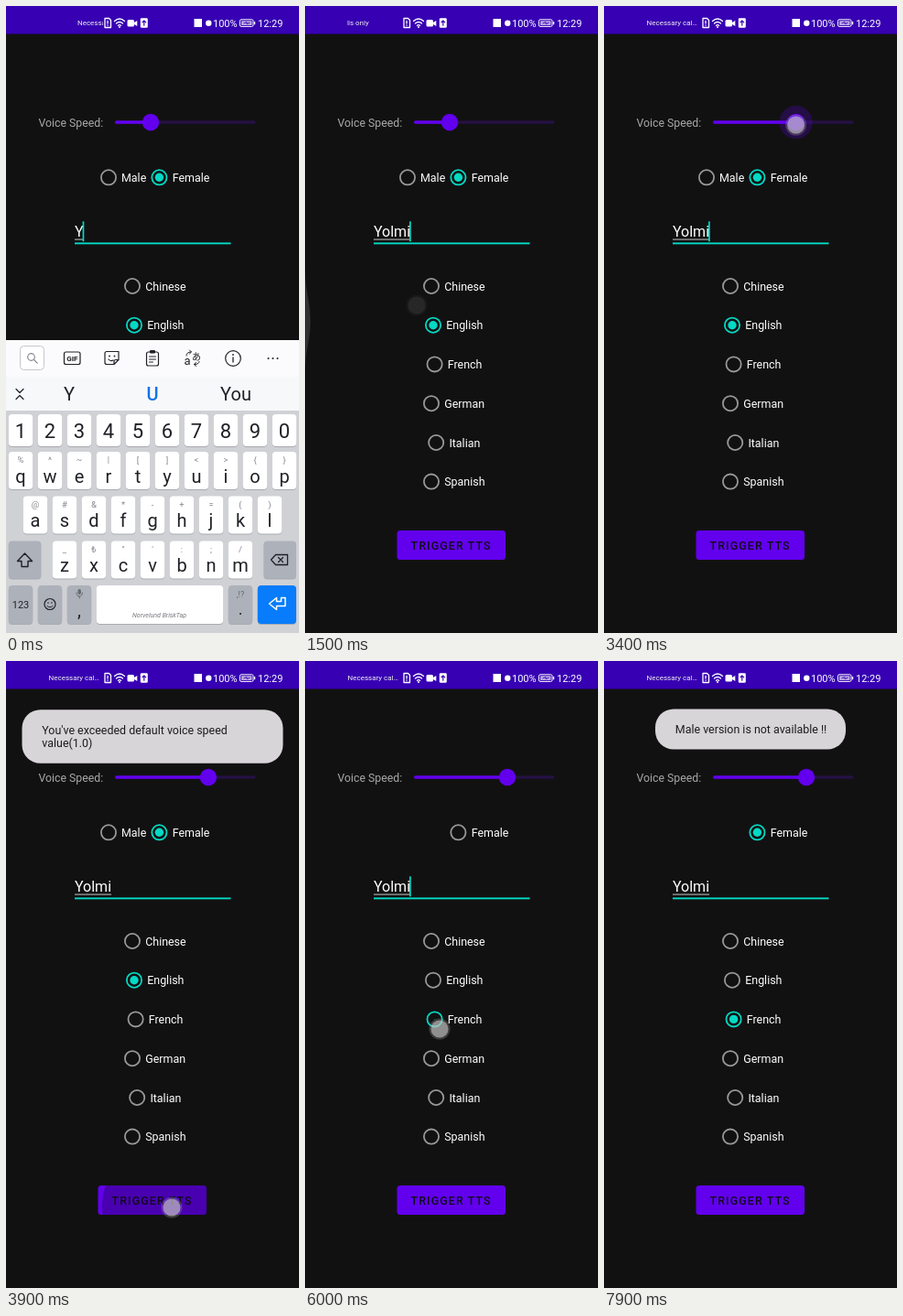
Recreate the animation shown at these times as an HTML page. Size 320 by 685 pixels, loop 8000 ms.

```html
<!DOCTYPE html>
<html lang="en">
<head>
<meta charset="utf-8">
<style>
html, body { margin: 0; width: 100%; height: 100%; overflow: hidden; background: #121112; }
svg { display: block; width: 320px; height: 685px; font-family: Roboto, "Noto Sans", sans-serif; }
text { white-space: pre; }
</style>
</head>
<body>
<svg viewBox="0 0 320 685">
  <defs>
    <clipPath id="carrierClip"><rect x="46" y="10" width="60" height="18"/></clipPath>
    <clipPath id="buttonClip"><rect x="100.5" y="573" width="118.5" height="32" rx="3.5"/></clipPath>
  </defs>
  <g id="app"></g>
  <g id="keyboard"></g>
  <g id="over"></g>
  <g id="status"></g>
  <g id="carrier" clip-path="url(#carrierClip)"></g>
</svg>
<script>
const LOOP = 8000;
const WORD = 'Yolmi', CARRIER = 'Necessary calls only';
const TEAL = '#03d9c4', PURPLE = '#6200ee';
const $ = id => document.getElementById(id);
const clamp = x => Math.max(0, Math.min(1, x));
const ramp = (t, a, b) => clamp((t - a) / (b - a));
const ease = x => x * x * (3 - 2 * x);
const within = (t, a, b) => t >= a && t < b;

const text = (s, x, y, size, fill, more = '') =>
  `<text x="${x}" y="${y}" font-size="${size}" fill="${fill}" ${more}>${s.replace(/&/g, '&amp;').replace(/</g, '&lt;')}</text>`;
const mid = (s, x, y, size, fill, more = '') => text(s, x, y, size, fill, 'text-anchor="middle" ' + more);
const rect = (x, y, w, h, r, fill, more = '') =>
  `<rect x="${x}" y="${y}" width="${w}" height="${h}" rx="${r}" fill="${fill}" ${more}/>`;
const circle = (x, y, r, fill, more = '') => `<circle cx="${x}" cy="${y}" r="${r}" fill="${fill}" ${more}/>`;
const line = (d, stroke, w = 1.2, more = '') =>
  `<path d="${d}" fill="none" stroke="${stroke}" stroke-width="${w}" stroke-linecap="round" stroke-linejoin="round" ${more}/>`;

// Status bar
$('status').innerHTML = rect(0, 0, 320, 30.5, 0, '#3700b3') +
  line('M108 13.5h4.5l2 2V23.5h-6.5z', '#fff', 1.3) + line('M111 16.5v2.6M111 21v.2', '#fff', 1.3) +
  line('M118.5 16.5q5.5-5 11 0M120.5 19q3.5-3 7 0M122.5 21.3q1.5-1.2 3 0', '#fff', 1.3) + circle(124, 23, 1, '#fff') +
  rect(132.5, 15, 7.5, 7.5, 1.5, '#fff') + '<path d="M140 18l3.3-2v6l-3.3-2z" fill="#fff"/>' +
  rect(146.8, 13.3, 8, 10.4, 1.2, '#fff') + line('M150.8 21.2v-5M148.9 17.8l1.9-1.9 1.9 1.9', '#3700b3', 1.2) +
  rect(205.5, 14, 8.5, 9, 0, '#fff') + circle(221.3, 18.7, 3.2, '#fff') +
  text('100%', 226, 22.8, 11, '#fff') +
  rect(255.5, 14.8, 14.5, 7.6, 1.5, 'none', 'stroke="#fff"') + rect(257, 16.3, 11.5, 4.6, .5, '#b9a5e4') +
  rect(270.8, 17, 1.4, 3.3, .5, '#fff') + line('M260 18.8l3-1.2v2l3-1.2', '#3700b3', .9) +
  text('12:29', 275, 22.8, 11, '#fff');

// Keyboard
const INK = '#202126', GREY = '#adb1ba';
const ROWS = [
  { keys: '1234567890', x: 16, y: 446, h: 35 },
  { keys: 'qwertyuiop', hints: '%^~|[]<>{}', x: 16, y: 487, h: 41 },
  { keys: 'asdfghjkl', hints: '@#&*-+=()', x: 32, y: 535.5, h: 41 },
  { keys: 'zxcvbnm', hints: '_₺"\':;/', x: 64, y: 584.5, h: 41 },
];
const keyAt = c => {
  const row = ROWS.find(r => r.keys.includes(c));
  return { x: row.x + 32 * row.keys.indexOf(c), y: row.y, h: row.h };
};
const key = (x, y, w, h, fill) => rect(x, y + 1, w, h, 4, '#a9abb1') + rect(x, y, w, h, 4, fill);

function keyboard() {
  let s = rect(0, 365, 320, 320, 0, '#d0d1d5') + rect(0, 365, 320, 77, 0, '#fbfbfd') + rect(0, 405, 320, 37, 0, '#f7f8fa');
  s += rect(15.5, 371.5, 26, 26, 4, '#fff', 'stroke="#c5c7cc"') +
    circle(27.5, 383.5, 3.8, 'none', 'stroke="#85888f" stroke-width="1.2"') + line('M30.5 386.5l3.7 3.7', '#85888f');
  s += rect(63.5, 378, 17.5, 13.5, 2, 'none', `stroke="${INK}" stroke-width="1.2"`) + mid('GIF', 72.3, 387.8, 8, INK, 'font-weight="700"');
  s += line('M110 377.5h13v9l-5 5h-8q-2 0-2-2v-10q0-2 2-2zM123 386.5h-3q-2 0-2 2v3M112 386q2 2.5 5 1', INK) +
    circle(113, 382.5, .9, INK) + circle(118.5, 382.5, .9, INK);
  s += rect(153.5, 378, 13, 15, 2, 'none', `stroke="${INK}" stroke-width="1.2"`) + rect(157, 376, 6, 3.5, 1, INK) +
    line('M156.5 383h7M156.5 386h7M156.5 389h4', INK, 1);
  s += text('a', 194.5, 392, 13, INK) + text('あ', 203, 387, 10, INK, 'font-family="Noto Sans CJK JP, Noto Sans CJK, sans-serif"') +
    line('M197 382q0-4 5-4M200.5 376l2 2-2 2M211 388.5q0 3-5 3M207.5 389.500l-2 2 2 2', INK, 1);
  s += circle(248, 385, 8.3, 'none', `stroke="${INK}" stroke-width="1.2"`) + line('M248 384v5', INK, 1.3) + circle(248, 381, .9, INK);
  for (const x of [286.5, 291.5, 296.5]) s += circle(x, 385, 1, INK);
  s += line('M11 418.500l4 4 4-4M11 429.500l4-4 4 4', INK);

  for (const r of ROWS) [...r.keys].forEach((c, i) => {
    const x = r.x + 32 * i;
    s += key(x - 13.2, r.y, 26.4, r.h, '#fff') + mid(c, x, r.hints ? r.y + 33.5 : r.y + 26, r.hints ? 20 : 22, INK);
    if (r.hints) s += mid(r.hints[i], x, r.y + 12, 9.5, '#85878d');
  });
  s += key(2.8, 584.5, 35.5, 41, GREY) + line('M20.500 598l8 8.500h-4.500v6h-7v-6h-4.500z', INK, 1.4);
  s += key(281.5, 584.5, 35.5, 41, GREY) + line('M294.500 599.500h13v11h-13l-5-5.500zM297.500 602.500l5 5M302.500 602.500l-5 5', INK, 1.3);
  s += key(2.8, 633, 26.4, 42, GREY) + mid('123', 16, 658, 11, INK);
  s += key(34.8, 633, 26.4, 42, GREY) + circle(48, 653.5, 6, 'none', `stroke="${INK}" stroke-width="1.2"`) +
    circle(46, 652, .8, INK) + circle(50, 652, .8, INK) + line('M45 655.500q3 3 6 0', INK, 1);
  s += key(66.8, 633, 26.4, 42, GREY) + rect(78.5, 637, 3.4, 6, 1.7, '#666a72') + line('M77 641q0 4 3.200 4t3.200-4M80.200 645v2', '#666a72', 1) +
    mid(',', 80, 667, 20, INK);
  s += key(98.8, 633, 138.4, 42, '#fff') + mid('Norvelund BriskTap', 167.5, 668, 7, '#77797f', 'font-style="italic"');
  s += key(242.8, 633, 26.4, 42, GREY) + mid(',!?', 256, 646, 9, '#666a72') + mid('.', 256, 665, 18, INK);
  s += key(274.8, 633, 42.2, 42, '#087cfa') +
    line('M305 646.500v9h-9.500v4l-8-6.500 8-6.500v4h5v-4z', '#fff', 1.5);
  return s + '<g id="suggest"></g>';
}
$('keyboard').innerHTML = keyboard();

// Letters after the first: press time and the suggestions that follow
const TYPED = [150, 350, 550, 750];
const SUGGEST = [['Y', 'U', 'You'], ['Yo', 'You', 'Your'], ['Yol', 'Yolk', 'Tool'], ['Yolm', 'Your', 'Film'], [WORD, 'Yolk', 'Tommy']];

// Touches: start, end, from x, y, to x, y
const TOUCHES = [
  ...TYPED.map((a, i) => {
    const k = keyAt(WORD[i + 1]);
    return [a - 40, a + 60, k.x, k.y + 24, k.x, k.y + 24];
  }),
  [1000, 1320, 4, 334, 122, 327],
  [2000, 2200, 181, 600, 181, 600],
  [3000, 3550, 158, 130, 221, 130],
  [3740, 4050, 181, 597, 181, 597],
  [5880, 6080, 147, 402, 147, 402],
  [7000, 7180, 199, 191, 199, 191],
];
const touch = (t, [a, b, x0, y0, x1, y1]) => {
  if (!within(t, a, b + 220)) return '';
  const p = ease(ramp(t, a, b)), o = ramp(t, a - 60, a + 50) * (1 - ramp(t, b, b + 220));
  const x = x0 + (x1 - x0) * p, y = y0 + (y1 - y0) * p;
  return `<g opacity="${o}">${circle(x, y, 11.5, '#bbb', 'opacity=".25"')}${circle(x, y, 9.5, '#c4c4c4', 'opacity=".62"')}</g>`;
};

const radio = (label, x, y, gap, on) => {
  const c = on >= 0 ? TEAL : '#989898';
  return circle(x, y, 8.1, 'none', `stroke="${c}" stroke-width="1.8"`) +
    (on > 0 ? circle(x, y, 4.7 * on, TEAL) : '') + text(label, x + gap, y + 4.5, 12.44, '#fff');
};
const picked = (t, at) => t < at ? -1 : ramp(t, at + 60, at + 190);

const ripple = (t, a, x, y) => within(t, a, a + 800)
  ? `<g clip-path="url(#buttonClip)">${circle(x, y, 76 * ramp(t, a, a + 120) + 30 * ramp(t, a + 120, a + 260), '#000',
      `opacity="${.26 * (1 - ramp(t, a + 350, a + 750))}"`)}</g>` : '';

const toast = (t, a, b, x, y, w, h, lines) => within(t, a, b)
  ? `<g opacity="${ramp(t, a - 160, a + 140) * 1.25 * (1 - ramp(t, b - 250, b))}" transform="translate(0 ${1.5 * (1 - ramp(t, a, a + 200))})">` +
    rect(x, y, w, h, 20, '#d7d5d7') + lines.map((s, i) => text(s, x + 21.8, y + 26.3 + 14.5 * i, 12.44, '#1d1c1d')).join('') + '</g>'
  : '';

const CURSOR_OFF = [1700, 2700, 3450, 4400, 5400, 6400, 7450];
const LANGS = [['Chinese', 138, 306], ['English', 140, 348.7], ['French', 141.6, 391.4],
  ['German', 138, 434.2], ['Italian', 143.2, 477], ['Spanish', 138, 519.6]];
const FRENCH = 5930, FEMALE = 7130;

function app(t, word) {
  const knob = 158 + 63 * ease(ramp(t, 3000, 3550));
  let s = text('Voice Speed:', 35.5, 131.5, 12.3, '#a8a8a8') +
    rect(119, 125.2, 153.5, 3.6, 1.8, '#251143') + rect(119, 125.2, knob - 119, 3.6, 1.8, PURPLE);
  if (within(t, 3000, 3650)) s += circle(knob, 127, 18, PURPLE, 'opacity=".24"');
  s += circle(knob, 127, 9.2, PURPLE);
  if (t < FRENCH) s += radio('Male', 112, 187.3, 14, -1);
  s += radio('Female', 167.4, 187.3, 14.3, t < FRENCH ? 1 : picked(t, FEMALE));

  s += `<text id="word" x="75" y="252.300" font-size="16" fill="#fff">${word}</text>`;
  for (const [name, x, y] of LANGS)
    s += radio(name, x, y, 14.2, name === 'English' && t < FRENCH ? 1 : name === 'French' ? picked(t, FRENCH) : -1);

  s += rect(75, 258.4, 170.5, 1.9, 0, TEAL) + rect(100.5, 573, 118.5, 32, 3.5, PURPLE) +
    ripple(t, 2050, 181, 600) + ripple(t, 3780, 181, 597) +
    text('TRIGGER TTS', 115.5, 593.6, 12.44, '#100c18', 'font-weight="500" letter-spacing="1.110"');
  return s;
}

function draw(t) {
  const n = TYPED.filter(a => t >= a).length;
  $('app').innerHTML = app(t, WORD.slice(0, n + 1));
  const w = $('word').getComputedTextLength();
  let extra = rect(75, 254.6, w, .9, 0, '#ddd');
  if (!CURSOR_OFF.some(a => within(t, a, a + 500))) extra += rect(74 + w, 235.3, 1.7, 22, 0, TEAL);
  $('app').innerHTML += extra;

  const drop = 325 * ease(ramp(t, 1230, 1480));
  $('keyboard').setAttribute('transform', `translate(0 ${drop})`);
  $('keyboard').setAttribute('visibility', drop < 325 ? 'visible' : 'hidden');
  const [a, b, c] = SUGGEST[n];
  let bar = mid(a, 69, 430.5, 20, INK) + mid(b, 160, 430.5, 20, '#1272e6', 'font-weight="500"') + mid(c, 251, 430.5, 20, INK);
  TYPED.forEach((at, i) => {
    const k = keyAt(WORD[i + 1]);
    if (within(t, at - 50, at + 70)) bar += rect(k.x - 13.2, k.y, 26.4, k.h, 4, '#000', 'opacity=".16"');
  });
  $('suggest').innerHTML = bar;

  const bulge = 18 * ramp(t, 1000, 1180) * (1 - ramp(t, 1290, 1605));
  $('over').innerHTML = (bulge ? `<path d="M0 284C0 312 ${bulge} 322 ${bulge} 344S0 376 0 404z" fill="#303030"/>` : '') +
    toast(t, 3800, 5700, 17.5, 52.5, 285, 58.5, ["You've exceeded default voice speed", 'value(1.0)']) +
    toast(t, 6150, 8300, 56, 52.5, 208, 44, ['Male version is not available !!']) +
    TOUCHES.map(k => touch(t, k)).join('');

  const y = 21.4, next = 56 - .054 * (t - 2600);
  $('carrier').innerHTML = next > 46
    ? text(CARRIER, 78 - .054 * t, y, 8, '#eee') + text(CARRIER, next, y, 8, '#eee')
    : text(CARRIER.slice(0, 13) + '…', 46.5, y, 8, '#eee');
}

function frame(now) {
  draw(now % LOOP);
  requestAnimationFrame(frame);
}
requestAnimationFrame(frame);
</script>
</body>
</html>
```
